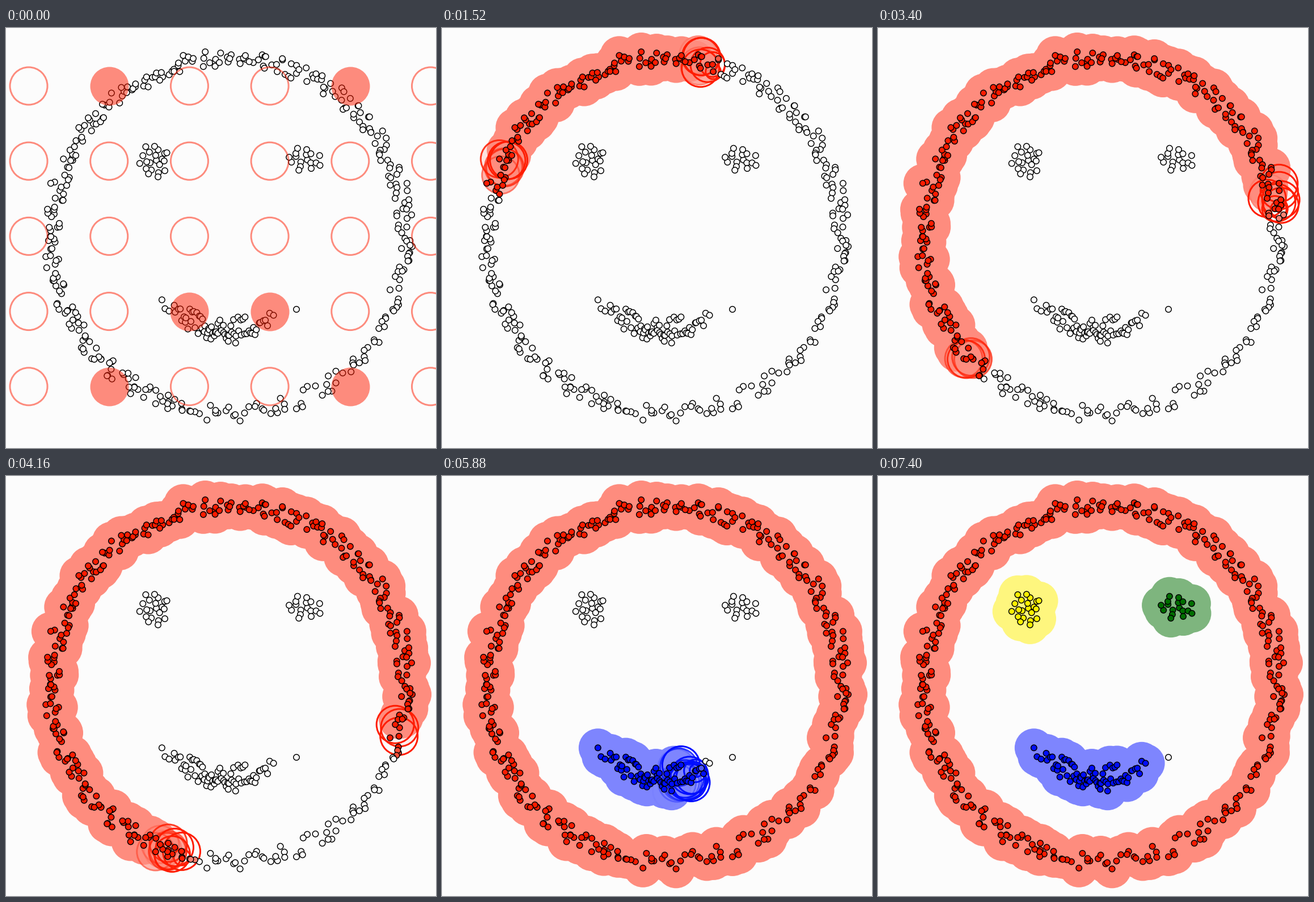
Write a matplotlib script that moves like this. It is 758 px wide and 739 px high and loops after 7.44 s.

```python
import numpy as np
import matplotlib.pyplot as plt
from matplotlib.animation import FuncAnimation

W, H, DPI = 758, 739, 100
FRAMES, STEP = 186, 40
PT = 72 / DPI                  # points per pixel
EPS, MIN_PTS = 34, 4
START, RATE = 0.3, 77.7        # seconds, points visited per second
BG = np.array([252, 252, 252]) / 255
COLORS = np.array([(255, 28, 0), (0, 14, 255), (0, 110, 0), (255, 240, 0)]) / 255

rng = np.random.default_rng(8)


def spread(n, jitter):
    """n uneven positions between 0 and 1."""
    return (np.arange(n) + jitter * rng.random(n)) / n % 1


def face(n=365):
    """Round band, thinner in its lower right quarter."""
    angle = np.radians(np.interp(spread(n, 3), [0, 0.18, 1], [103, 193, 463]))
    r = rng.uniform(298, 328, n)
    return np.column_stack([393 + r * np.sin(angle), 366 - r * np.cos(angle)])


def smile(n=74):
    """Parabola that is thick in the middle, with one stray point."""
    s = np.arccos(1 - 2 * spread(n, 1)) / np.pi
    x = 263 + 225 * s
    thick = 24 * np.sqrt(np.sin(np.pi * s))
    y = 532 - 0.0035 * (x - 393) ** 2 + thick * rng.uniform(-1, 1, n)
    return np.vstack([np.column_stack([x, y]), (512, 495)])


def eye(cx, cy, rx, ry, n):
    """Loose sunflower spiral."""
    i = np.arange(n)
    r = np.sqrt((i + 0.5) / n)
    angle = i * 2.4 + rng.uniform(-0.4, 0.4, n)
    return np.column_stack([cx + rx * r * np.cos(angle),
                            cy + ry * r * np.sin(angle)])


groups = [face(), smile(), eye(526, 231, 32, 22, 17), eye(261, 234, 28, 30, 21)]
origins = [(243, 90), (345, 515), (526, 231), (261, 234)]

pts = np.vstack(groups)
label = np.repeat(np.arange(4), [len(g) for g in groups])
near = np.hypot(*(pts[:, None] - pts[None]).T) <= EPS
core = near.sum(axis=1) >= MIN_PTS


def dbscan_times():
    """Moments at which each point is visited and first found."""
    visit = np.full(len(pts), np.inf)
    found = np.full(len(pts), np.inf)
    clock = START
    for k, origin in enumerate(origins):
        gap = np.hypot(*(pts - origin).T)
        queue = [np.argmin(np.where(label == k, gap, np.inf))]
        found[queue[0]] = clock
        for p in queue:
            visit[p] = clock
            if core[p]:
                for q in np.flatnonzero(near[p] & np.isinf(found)):
                    found[q] = clock + 0.03
                    queue.append(q)
            clock += 1 / RATE
    return visit, found


visit, found = dbscan_times()
vivid = COLORS[label]
tint = (vivid + BG) / 2


def ramp(t, start, length):
    return np.clip((t - start) / length, 0, 1)


def area(radius):
    return (2 * radius * PT) ** 2


def rgba(rgb, alpha):
    return np.column_stack([rgb, alpha])


fig = plt.figure(figsize=(W / DPI, H / DPI), dpi=DPI, facecolor=BG)
ax = fig.add_axes([0, 0, 1, 1])
ax.set(xlim=(0, W), ylim=(H, 0))
ax.axis("off")

discs = ax.scatter(*pts.T, s=area(EPS), linewidths=0, zorder=1)
rings = ax.scatter([], [], facecolors="none", linewidths=3 * PT, zorder=2)
dots = ax.scatter(*pts.T, s=area(5.2), edgecolors="black",
                  linewidths=1.5 * PT, zorder=3)

# Preview grid of neighbourhoods, filled where they are dense enough.
cells = np.array([(c, r) for r in range(5) for c in range(6)])
dense = np.array([(c, r) in {(1, 0), (4, 0), (2, 3), (3, 3), (1, 4), (4, 4)}
                  for c, r in cells.tolist()])
centers = np.array([40, 102]) + cells * [141.7, 132.2]
grid = [ax.scatter(*centers[dense].T, s=area(EPS), color=[COLORS[0]],
                   alpha=0.5, linewidths=0, zorder=4),
        ax.scatter(*centers[~dense].T, s=area(33), facecolors="none",
                   edgecolors=[(*COLORS[0], 0.5)], linewidths=3 * PT, zorder=4)]


def draw(i):
    t = i * STEP / 1000
    age = t - visit

    for g in grid:
        g.set_visible(t < START)

    discs.set_facecolors(rgba(tint, ramp(age, 0.09, 0.1) * core))

    live = (age >= 0) & (age < 0.19)
    rings.set_offsets(pts[live])
    rings.set_sizes(area(33 * ramp(age[live], -0.01, 0.05)))
    rings.set_edgecolors(rgba(vivid[live], 1 - ramp(age[live], 0.1, 0.09)))

    mix = ramp(t, found, 0.06)[:, None]
    dots.set_facecolors(1 + mix * (vivid - 1))
    return [discs, rings, dots, *grid]


anim = FuncAnimation(fig, draw, frames=FRAMES, interval=STEP, repeat=True)
plt.show()
```
